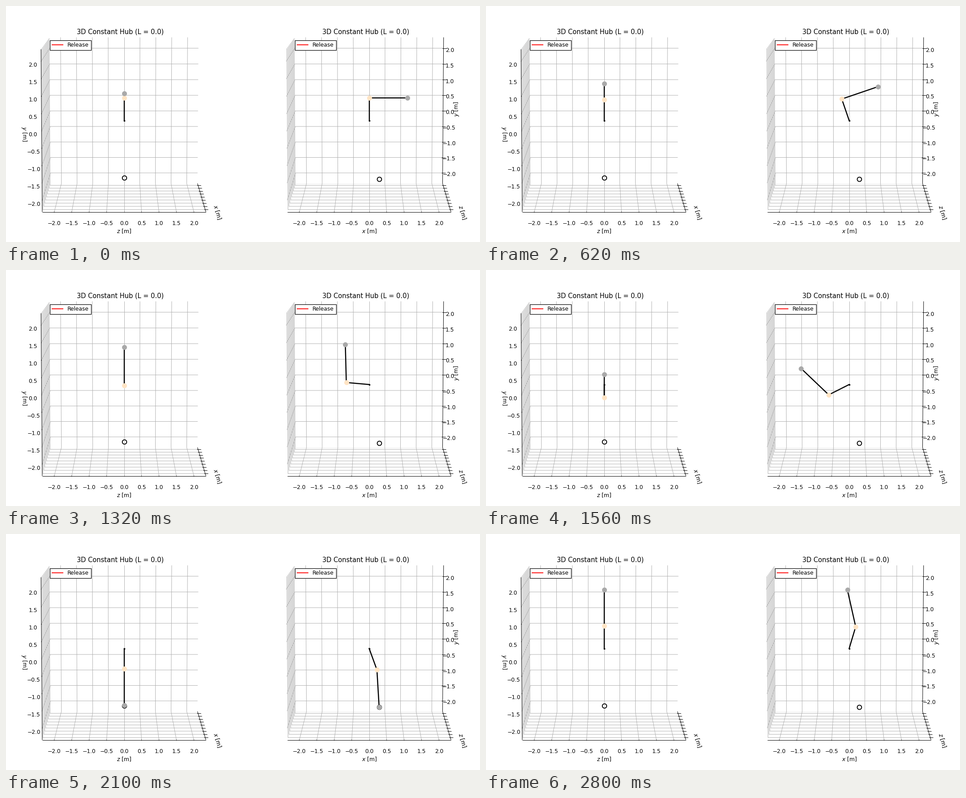
These frames come from a looping animation (1058 px wide and 529 px high, 2820 ms). A matplotlib script:

```python
import numpy as np
import matplotlib.pyplot as plt
from matplotlib.animation import FuncAnimation
from matplotlib.collections import LineCollection
from matplotlib.patches import Rectangle

W, H, DPI = 1058, 529, 88
FRAMES, STEP = 141, 20

plt.rcParams["font.family"] = "DejaVu Sans"

# Perspective camera: u to the right, v up, w towards the viewer
ELEV = np.radians(7.5)
SIN, COS = np.sin(ELEV), np.cos(ELEV)
SCALE = 1.1003 / 4.6875
FOCAL, DIST = 3163, 10
LIM = 2.34375
TICKS = np.arange(-2, 2.1, 0.5)
CY = 256.7

ARM, SLING = 0.69, 1.15
TARGET = (0.3, -1.8)


def project(cx, u, v, w):
    u, v, w = u * SCALE, v * SCALE, w * SCALE
    depth = DIST - w * COS - v * SIN
    return cx + FOCAL * u / depth, CY - FOCAL * (v * COS - w * SIN) / depth


def spline(x, y, start, end):
    """Cubic spline with fixed end slopes; returns a function."""
    x, y = np.array(x), np.array(y)
    h, d = np.diff(x), np.diff(y) / np.diff(x)
    n = len(x)
    a, b = np.eye(n), np.zeros(n)
    b[0], b[-1] = start, end
    for i in range(1, n - 1):
        a[i, i - 1:i + 2] = h[i], 2 * (h[i - 1] + h[i]), h[i - 1]
        b[i] = 3 * (h[i] * d[i - 1] + h[i - 1] * d[i])
    m = np.linalg.solve(a, b)

    def value(t):
        i = int(np.clip(np.searchsorted(x, t) - 1, 0, n - 2))
        s = (t - x[i]) / h[i]
        return ((1 + 2 * s) * (1 - s) ** 2 * y[i] + s * s * (3 - 2 * s) * y[i + 1]
                + h[i] * s * (1 - s) * ((1 - s) * m[i] - s * m[i + 1]))
    return value


# Swing of the arm and direction of the sling, in degrees over seconds
arm_turn = spline([0, 0.62, 1.06, 1.32, 1.78, 2.4, 2.8],
                  [0, 18.7, 54.8, 84.9, 149.2, 254.5, 343.5], 0, 246)
sling_turn = spline([0, 0.62, 1.06, 1.32, 1.62, 1.78, 2.16, 2.4, 2.7, 2.8],
                    [0, 19, 55.7, 91.3, 148.7, 185.8, 291, 361.3, 440, 462.6],
                    0, 215)

fig = plt.figure(figsize=((W + 0.001) / DPI, (H + 0.001) / DPI), dpi=DPI,
                 facecolor="white")
ax = fig.add_axes([0, 0, 1, 1])
ax.set_xlim(0, W)
ax.set_ylim(H, 0)
ax.axis("off")


def lines(segments, color, z):
    ax.add_collection(LineCollection(segments, colors=color, linewidths=0.8, zorder=z))


def number(x, y, value):
    ax.text(x, y + 4.4, f"{value:.1f}".replace("-", "\u2212"), size=10, ha="center")


def label(x, y, name, angle=0):
    ax.text(x, y, f"${name}$ [m]", size=10, ha="center", va="center",
            rotation=angle, rotation_mode="default")


class Panel:
    def __init__(self, cx, side, across, depth, legend_x, title_x):
        self.cx, self.side = cx, side
        self.draw_box()
        self.draw_legend(legend_x)
        ax.text(title_x, 62.8, "3D Constant Hub (L = 0.0)", size=12, ha="center")

        for i, t in enumerate(TICKS):
            number(cx - 156.1 + 39.05 * i, 486.5, t)
        label(cx, 504.5, across)
        label(cx + 208, 462.5, depth, -74)
        self.draw_height_axis()

        ring = self.place(*TARGET)
        ax.plot(*ring, "o", ms=8, mfc="none", mec="black", mew=1.5, zorder=5)
        self.rod, = ax.plot([], [], color="black", lw=2, zorder=6)
        ax.plot(*self.place(0, 0), "o", ms=2, color="black", zorder=6)
        self.hub, = ax.plot([], [], "o", ms=8, color="bisque", zorder=7)
        self.ball, = ax.plot([], [], "o", ms=8, color="darkgray", zorder=8)

    def seg(self, *points):
        return [project(self.cx, *p) for p in points]

    def draw_box(self):
        grid = []
        for t in TICKS:
            grid.append(self.seg((t, -LIM, LIM), (t, -LIM, -LIM), (t, LIM, -LIM)))
            grid.append(self.seg((LIM, -LIM, t), (-LIM, -LIM, t), (-LIM, LIM, t)))
            grid.append(self.seg((-LIM, t, LIM), (-LIM, t, -LIM), (LIM, t, -LIM)))
        lines(grid, "#b0b0b0", 2)

        black = [self.seg((-LIM, -LIM, LIM), (LIM, -LIM, LIM)),
                 self.seg((LIM, -LIM, LIM), (LIM, -LIM, -LIM))]
        for t in TICKS:
            black.append(self.seg((LIM - 0.035, -LIM, t), (LIM + 0.085, -LIM, t)))
            black.append(self.seg((t, -LIM, LIM - 0.04), (t, -LIM, LIM + 0.04)))
        lines(black, "black", 3)

    def draw_height_axis(self):
        black = []
        if self.side == "left":
            black.append(self.seg((-LIM, -LIM, LIM), (-LIM, LIM, LIM)))
            for i, t in enumerate(TICKS):
                black.append(self.seg((-LIM, t, LIM - 0.08), (-LIM, t, LIM + 0.04)))
                number(60 if t >= 0 else 62, 443.5 - 39.05 * i, t)
            label(40, 287, "y", -90)
        else:
            black.append(self.seg((LIM, -LIM, -LIM), (LIM, LIM, -LIM)))
            lines([self.seg((-LIM, -LIM, -LIM), (LIM, -LIM, -LIM))], "#eeeeee", 1)
            for i, t in enumerate(TICKS):
                black.append(self.seg((LIM - 0.035, t, -LIM), (LIM + 0.085, t, -LIM)))
                number(990.5 if t >= 0 else 989, 376.5 - 34.7 * i, t)
            label(1005, 231, "y", 90)
        lines(black, "black", 3)

    def draw_legend(self, x):
        ax.add_patch(Rectangle((x, 77), 92, 22, fc="white", ec="black", lw=1, zorder=9))
        ax.plot([x + 4.5, x + 29], [87, 87], color="red", lw=1.5, zorder=10)
        ax.text(x + 39, 91.2, "Release", size=10, zorder=10)

    def place(self, x, y):
        # The left view looks along x, the right one faces the swing plane
        if self.side == "left":
            return project(self.cx, 0, y, -x)
        return project(self.cx, x, y, 0)

    def pose(self, hub, ball):
        pts = [self.place(0, 0), self.place(*hub), self.place(*ball)]
        self.rod.set_data(*zip(*pts))
        self.hub.set_data(*zip(pts[1]))
        self.ball.set_data(*zip(pts[2]))


panels = [Panel(263.55, "left", "z", "x", 98, 255),
          Panel(810.6, "right", "x", "z", 645.2, 802.6)]


def update(i):
    t = i * STEP / 1000
    a = np.radians(90 + arm_turn(t))
    b = np.radians(sling_turn(t))
    hub = ARM * np.cos(a), ARM * np.sin(a)
    ball = hub[0] + SLING * np.cos(b), hub[1] + SLING * np.sin(b)
    for p in panels:
        p.pose(hub, ball)
    return []


anim = FuncAnimation(fig, update, frames=FRAMES, interval=STEP,
                     repeat=True, repeat_delay=0, blit=False)
plt.show()
```
